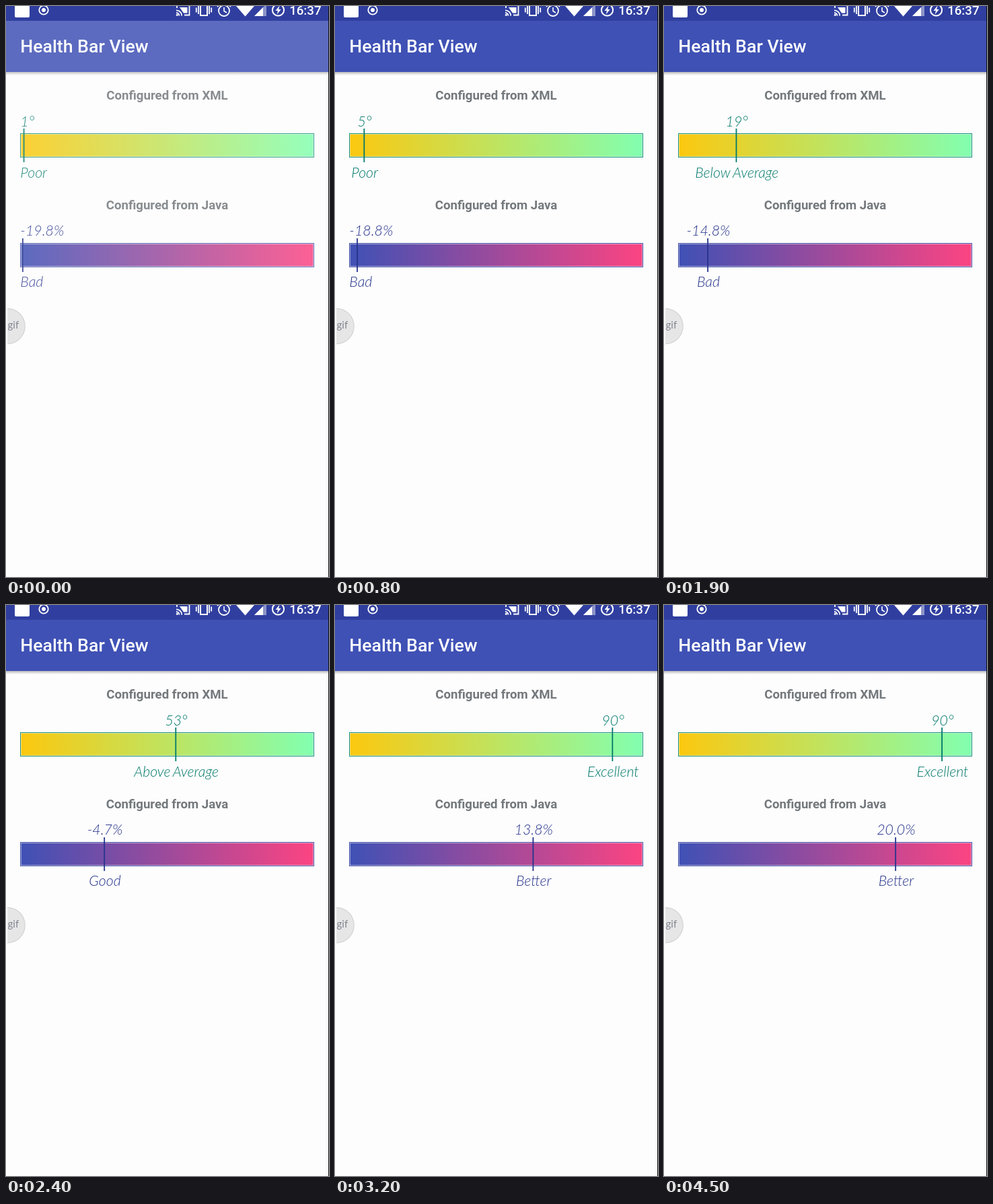
Recreate the animation shown at these times as an HTML page with a canvas. Size 480x848 px, loop 4.7 s.

```html
<!DOCTYPE html>
<html lang="en">
<head>
<meta charset="utf-8">
<title>Health Bar View</title>
<style>
html, body { margin: 0; width: 100%; height: 100%; overflow: hidden; background: #fdfdfd; }
canvas { display: block; width: 480px; height: 848px; }
</style>
</head>
<body>
<canvas id="stage" width="480" height="848"></canvas>
<script>
const ctx = document.getElementById('stage').getContext('2d');
const LOOP = 4700, STEP = 100;
const LEFT = 23.4, RIGHT = 456.4;
const LABEL_FONT = 'italic 300 21.33px Lato, sans-serif';

const CLOCK = [[0, .044], [800, .111], [1200, .142], [1800, .195],
  [1900, .2349], [2400, .4247], [3200, .7424], [3850, 1]];

const BARS = [
  { title: 'Configured from XML', top: 189, titleY: 139, valueY: 179, labelY: 255,
    ink: '#00796b', border: '#1b8f80', from: '#fcc80f', to: '#82ffb0',
    min: 0, max: 100, start: 0, end: 90, speed: 1 / .764,
    format: v => Math.round(v) + '°',
    labels: [[15, 'Poor'], [50, 'Below Average'], [78, 'Above Average'], [Infinity, 'Excellent']] },
  { title: 'Configured from Java', top: 352, titleY: 302, valueY: 341, labelY: 417,
    ink: '#26338c', border: '#4452a8', from: '#3f51b5', to: '#fc4482',
    min: -20, max: 34, start: -20, end: 20, speed: 1,
    format: v => v.toFixed(1) + '%',
    labels: [[-10, 'Bad'], [10, 'Good'], [Infinity, 'Better']] }
];

function progress(t) {
  for (let i = 1; i < CLOCK.length; i++) {
    const [t0, p0] = CLOCK[i - 1], [t1, p1] = CLOCK[i];
    if (t < t1) return p0 + (p1 - p0) * (t - t0) / (t1 - t0);
  }
  return 1;
}

const ease = p => (1 - Math.cos(Math.PI * Math.min(1, p))) / 2;

function rect(x, y, w, h, fill) {
  ctx.fillStyle = fill;
  ctx.fillRect(x, y, w, h);
}

function text(str, x, y, font, fill, align = 'left') {
  ctx.font = font;
  ctx.fillStyle = fill;
  ctx.textAlign = align;
  ctx.fillText(str, x, y);
}

function poly(points, fill) {
  ctx.beginPath();
  points.forEach(([x, y]) => ctx.lineTo(x, y));
  ctx.closePath();
  ctx.fillStyle = fill;
  ctx.fill();
}

function line(points, width, color = '#fff') {
  ctx.beginPath();
  points.forEach(([x, y]) => ctx.lineTo(x, y));
  ctx.lineWidth = width;
  ctx.strokeStyle = color;
  ctx.stroke();
}

function arc(x, y, r, width, a = 0, b = Math.PI * 2) {
  ctx.beginPath();
  ctx.arc(x, y, r, a, b);
  ctx.lineWidth = width;
  ctx.strokeStyle = '#fff';
  ctx.stroke();
}

function disc(x, y, r, fill) {
  ctx.beginPath();
  ctx.arc(x, y, r, 0, Math.PI * 2);
  ctx.fillStyle = fill;
  ctx.fill();
}

function statusBar() {
  rect(0, 0, 480, 22, '#303f9f');

  ctx.beginPath();
  ctx.roundRect(13, -6, 22, 23, 2);
  ctx.fillStyle = '#fff';
  ctx.fill();

  arc(56, 6, 6.7, 1.8);
  disc(56, 6, 3, '#fff');

  // Cast
  line([[254, 3], [254, -1], [272.5, -1], [272.5, 13.5], [265, 13.5]], 1.8);
  for (const r of [4.5, 8.2]) arc(253, 14.5, r, 1.8, -Math.PI / 2, 0);
  disc(254.3, 13.3, 1.5, '#fff');
  poly([[258, 2], [269.5, 2], [269.5, 10.5], [264, 10.5]], '#fff');

  // Vibrate
  ctx.lineWidth = 2;
  ctx.strokeStyle = '#fff';
  ctx.strokeRect(289, -3, 10, 17);
  for (const s of [-1, 1]) {
    line([[294 + s * 8, 0], [294 + s * 8, 12]], 1.8);
    line([[294 + s * 11.2, 2.5], [294 + s * 11.2, 9.5]], 1.8);
  }

  // Alarm
  arc(324, 7, 8, 1.8);
  line([[324, 2], [324, 7.5], [328, 10]], 1.6);
  line([[314, 1], [318, -2.5]], 1.8);
  line([[334, 1], [330, -2.5]], 1.8);

  // Wi-Fi and signal
  poly([[342, 0], [369, 0], [355.5, 15.5]], '#fff');
  poly([[369, 15], [387, -3], [387, 15]], '#8d95c9');
  poly([[369, 15], [382, 2], [382, 15]], '#fff');

  // Charging
  arc(404.5, 6, 8.6, 2);
  poly([[406.5, -.5], [400.5, 7], [404, 7], [402.7, 12.5], [408.7, 5], [405.2, 5]], '#fff');

  text('16:37', 468.5, 13, '500 18.67px Roboto, sans-serif', '#fff', 'right');
}

function toolbar() {
  const shade = ctx.createLinearGradient(0, 98, 0, 103);
  shade.addColorStop(0, 'rgba(0,0,0,.26)');
  shade.addColorStop(1, 'rgba(0,0,0,0)');
  rect(0, 98, 480, 5, shade);
  rect(0, 22, 480, 76, '#3f51b5');
  text('Health Bar View', 21.3, 69, '500 26.67px Roboto, sans-serif', '#fff');
}

// Centres a label on x but keeps it inside the bar.
function follow(str, x, y, ink) {
  ctx.font = LABEL_FONT;
  ctx.wordSpacing = '-2.2px';
  const w = ctx.measureText(str).width;
  const left = Math.max(21.3, Math.min(458 - w, x + .8 - w / 2));
  text(str, left, y, LABEL_FONT, ink);
  ctx.wordSpacing = '0px';
}

function healthBar(bar, p) {
  const value = bar.start + (bar.end - bar.start) * ease(p * bar.speed);
  const x = LEFT + (RIGHT - LEFT) * (value - bar.min) / (bar.max - bar.min);

  text(bar.title, 239.5, bar.titleY, 'bold 18.67px Roboto, sans-serif', '#73787c', 'center');

  // The fill sits just inside the border, leaving a faint light seam.
  const fill = ctx.createLinearGradient(22, 0, 457, 0);
  fill.addColorStop(0, bar.from);
  fill.addColorStop(1, bar.to);
  rect(22.5, bar.top + 1.5, 434, 33, fill);
  ctx.lineWidth = 1;
  ctx.strokeStyle = bar.border;
  ctx.strokeRect(21.5, bar.top + .5, 436, 35);

  line([[x, bar.top - 7], [x, bar.top + 43]], 1.8, bar.ink);
  follow(bar.format(value), x, bar.valueY, bar.ink);
  follow(bar.labels.find(([limit]) => value < limit)[1], x, bar.labelY, bar.ink);
}

function handle() {
  ctx.save();
  ctx.beginPath();
  ctx.rect(2, 440, 40, 70);
  ctx.clip();
  disc(2, 475.5, 26.8, '#cfcfd1');
  disc(2, 475.5, 25.8, '#e6e6e7');
  text('gif', 2.5, 479, '15px Lato, sans-serif', '#82868f');
  ctx.restore();
}

function draw(t) {
  const p = progress(t);
  rect(0, 0, 480, 848, '#fdfdfd');
  toolbar();
  BARS.forEach(bar => healthBar(bar, p));

  // Launch screen fading away
  const veil = .15 * Math.max(0, 1 - t / 300) ** 2;
  if (veil) rect(0, 22, 480, 826, `rgba(255,255,255,${veil})`);

  statusBar();
  handle();
  rect(479, 0, 1, 848, '#111');
}

const begin = performance.now();
function tick() {
  const t = (performance.now() - begin) % LOOP;
  draw(Math.floor(t / STEP) * STEP);
  requestAnimationFrame(tick);
}
tick();
</script>
</body>
</html>
```
